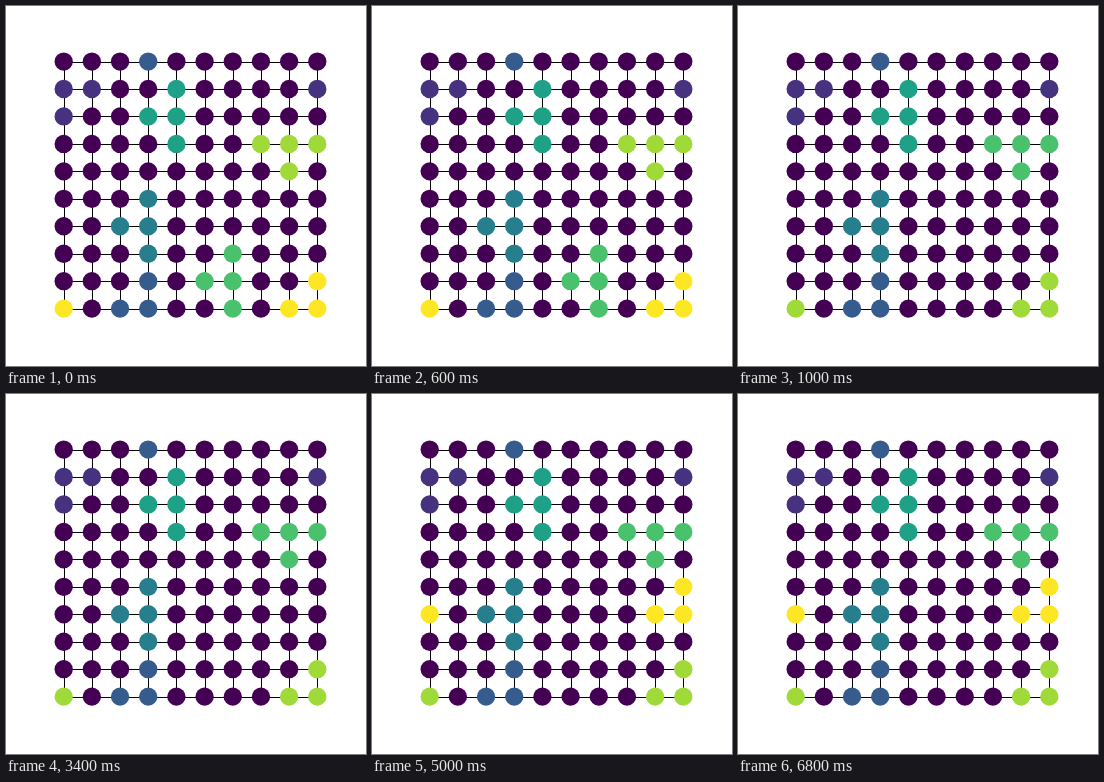
An HTML page that plays this animation: 360 by 360 pixels, repeating every 8 s.

```html
<!DOCTYPE html>
<html lang="en">
<head>
<meta charset="utf-8">
<title>Grid colouring</title>
<style>
  html, body { margin: 0; width: 100%; height: 100%; overflow: hidden; background: #fff; }
  svg { display: block; width: 100vw; height: 100vh; }
</style>
</head>
<body>
<svg viewBox="0 0 360 360"></svg>
<script>
const SIZE = 10, LOOP = 8000;
const X0 = 57.68, DX = 28.182, Y0 = 55.55, DY = 27.455, R = 9.16;
const COLORS = ['#440154', '#46327e', '#365c8d', '#277f8e', '#1fa187', '#4ac16d', '#a0da39', '#fde725'];

// One digit per node: index into COLORS.
const START = [
  '0002000000',
  '1100400001',
  '1004400000',
  '0000400666',
  '0000000060',
  '0003000000',
  '0033000000',
  '0003005000',
  '0002055007',
  '7022005077'
].join('');

// Drop group 5 and shift the later groups down.
const shifted = START.replace(/[567]/g, d => d === '5' ? 0 : d - 1);
// A new group appears, wrapping round the sides.
const added = [[5, 9], [6, 0], [6, 8], [6, 9]].map(([row, col]) => row * SIZE + col);
const grown = [...shifted].map((d, i) => added.includes(i) ? 7 : d).join('');

const STEPS = [
  { at: 0, cells: START },
  { at: 1000, cells: shifted },
  { at: 5000, cells: grown }
];

const svg = document.querySelector('svg');
function add(tag, attrs) {
  const el = document.createElementNS('http://www.w3.org/2000/svg', tag);
  for (const key in attrs) el.setAttribute(key, attrs[key]);
  return svg.appendChild(el);
}

const px = col => X0 + col * DX;
const py = row => Y0 + row * DY;
const snap = v => Math.floor(v + 0.5) + 0.5;
const last = SIZE - 1;

let edges = '';
for (let i = 0; i < SIZE; i++) {
  edges += `M${px(0)} ${snap(py(i))}H${px(last)}M${snap(px(i))} ${py(0)}V${py(last)}`;
}
add('path', { d: edges, stroke: '#000', 'stroke-width': 1, fill: 'none' });

const nodes = [...START].map((d, i) => add('circle', {
  cx: px(i % SIZE), cy: py(Math.floor(i / SIZE)), r: R, fill: COLORS[d]
}));

let shown = STEPS[0];
const begin = performance.now();
function draw(now) {
  const t = Math.max(0, now - begin) % LOOP;
  const step = STEPS.filter(s => s.at <= t).pop();
  if (step !== shown) {
    nodes.forEach((node, i) => node.setAttribute('fill', COLORS[step.cells[i]]));
    shown = step;
  }
  requestAnimationFrame(draw);
}
requestAnimationFrame(draw);
</script>
</body>
</html>
```
